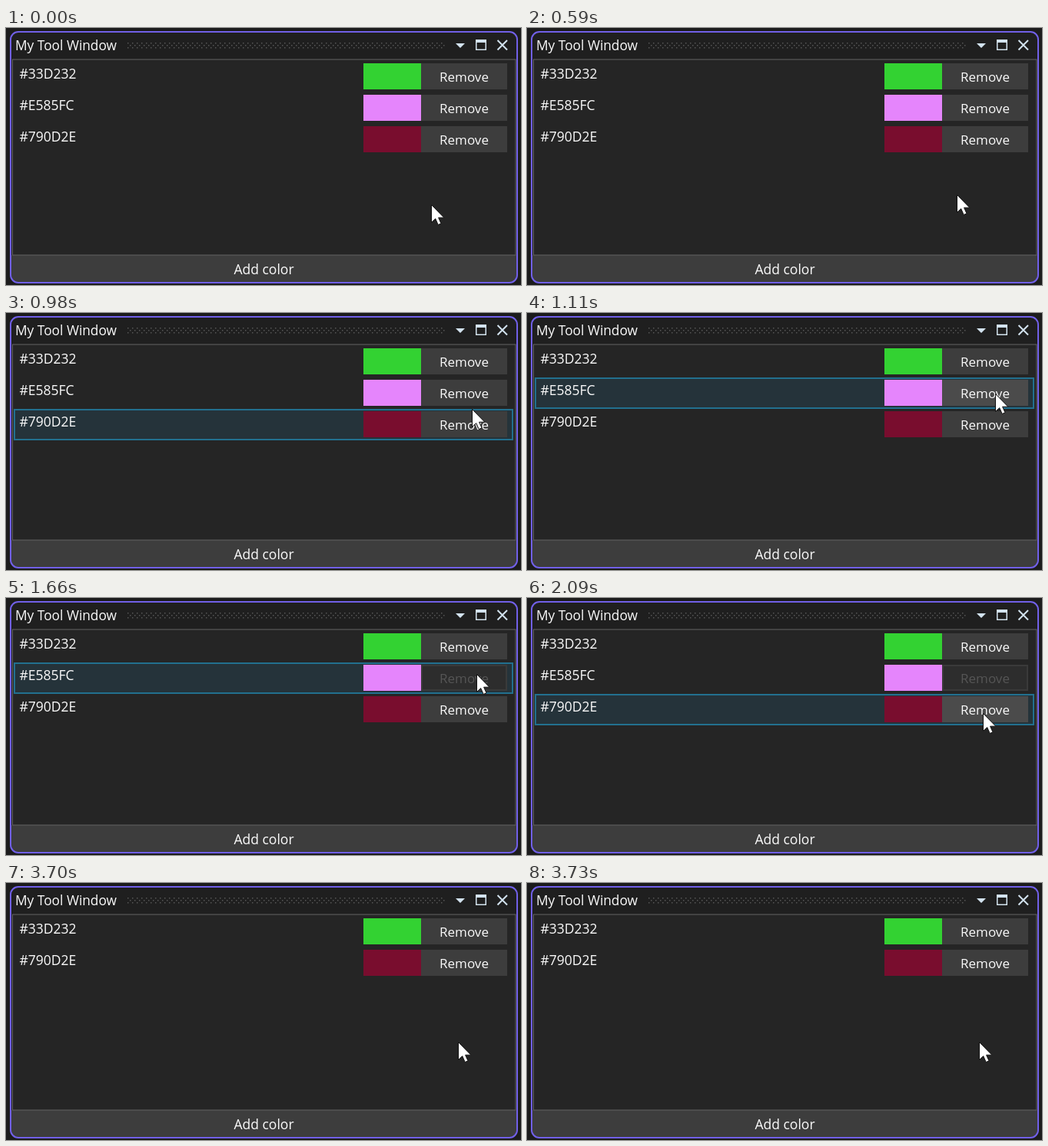
Write an HTML page that moves like this. It is 670 by 335 pixels and loops after 4.65 s.

```html
<!DOCTYPE html>
<html lang="en">
<head>
<meta charset="utf-8">
<title>Tool window</title>
<style>
  html, body { margin: 0; width: 100%; height: 100%; overflow: hidden; background: #1c1c1c; }
  svg { display: block; width: 100%; height: 100%; }
  text { font-family: "Open Sans", "Noto Sans", sans-serif; font-size: 17.5px; fill: #fafafa; }
  .title { font-size: 17.3px; }
  .remove { font-size: 17px; }
  .centered { text-anchor: middle; }
  .icon { fill: #d3e3ef; }
</style>
</head>
<body>
<svg viewBox="0 0 670 335">
  <defs>
    <pattern id="grip" x="158" y="19" width="6" height="6" patternUnits="userSpaceOnUse">
      <path d="M0 0h1.5v1.5h-1.5zM3 3h1.5v1.5h-1.5z" fill="#565656"/>
    </pattern>
  </defs>

  <rect x="6" y="5" width="659" height="327" rx="10" fill="#1f1f1f"/>
  <path d="M7 296H664V322Q664 331 655 331H16Q7 331 7 322Z" fill="#3d3d3d"/>
  <rect x="8.5" y="41" width="654.5" height="255" fill="#252525" stroke="#646464"/>
  <rect x="6" y="5" width="659" height="327" rx="10" fill="none" stroke="#7160e8" stroke-width="2"/>

  <text class="title" x="12" y="29">My Tool Window</text>
  <rect x="158" y="19" width="414" height="8" fill="url(#grip)"/>
  <path class="icon" d="M585 20h12l-6 6zM611 15h14v14h-14zM612.5 19v8.5h11v-8.5z" fill-rule="evenodd"/>
  <path d="M639.5 16L652 28.5M652 16L639.5 28.5" stroke="#d3e3ef" stroke-width="2"/>

  <g id="rows"></g>
  <text class="centered" x="335.5" y="321">Add color</text>
  <path id="cursor" d="M.5 .5V23.5L5.7 18.6L9.2 26.5L13 24.8L9.6 17.2H16.8Z"
        fill="#fff" stroke="#111" stroke-width="1"/>
</svg>

<script>
const LOOP = 4650, PRESS = 1530, DISABLE = 1660, REMOVE = 3700;
const ROW_TOP = 43, ROW_HEIGHT = 41;
const COLORS = ["#33D232", "#E585FC", "#790D2E"];

// time, x, y, number of held steps until the next key
const PATH = [
  [0, 553, 230, 1],
  [590, 559, 217, 6],
  [785, 585, 167, 6],
  [980, 606, 125, 4],
  [1110, 609, 105, 1],
  [1210, 611, 101, 1],
  [1240, 612, 99, 1],
  [2020, 607, 113, 2],
  [2090, 593, 150, 5],
  [2260, 588, 191, 4],
  [2390, 588, 207, 1],
  [LOOP, 588, 207, 1]
];

const BUTTON = {
  normal: ["#3d3d3d", "#3d3d3d", "#fafafa"],
  hover: ["#4b4b4b", "#4b4b4b", "#fafafa"],
  pressed: ["#555555", "#555555", "#fafafa"],
  disabled: ["#2d2d2d", "#3a3a3a", "#555555"]
};

function add(parent, tag, attributes, text = "") {
  const node = document.createElementNS("http://www.w3.org/2000/svg", tag);
  for (const name in attributes) node.setAttribute(name, attributes[name]);
  node.textContent = text;
  return parent.appendChild(node);
}

const cursor = document.getElementById("cursor");
const rows = COLORS.map(color => {
  const group = add(document.getElementById("rows"), "g", {});
  const highlight = add(group, "rect",
    { x: 11, y: 1, width: 648, height: 39, fill: "#25333a", stroke: "#22708f", "stroke-width": 2 });
  add(group, "text", { x: 17.5, y: 23 }, color);
  const button = add(group, "rect", { x: 541, y: 4, width: 110, height: 32, "stroke-width": 2 });
  add(group, "rect", { x: 465, y: 3, width: 75, height: 34, fill: color });
  const label = add(group, "text", { x: 596, y: 27, class: "remove centered" }, "Remove");
  return { group, highlight, button, label };
});

function cursorAt(time) {
  const i = PATH.findIndex((key, n) => n === PATH.length - 2 || time < PATH[n + 1][0]);
  const [start, x, y, steps] = PATH[i];
  const [end, nextX, nextY] = PATH[i + 1];
  const u = Math.floor((time - start) / (end - start) * steps + 1e-6) / steps;
  return [x + (nextX - x) * u, y + (nextY - y) * u];
}

function buttonState(index, x, localY, time) {
  if (index === 1 && time >= DISABLE) return "disabled";
  const over = x >= 540 && x < 652 && localY >= 3 && localY < 37;
  if (!over) return "normal";
  return index === 1 && time >= PRESS ? "pressed" : "hover";
}

function draw(time) {
  const [x, y] = cursorAt(time);
  const removed = time >= REMOVE;
  cursor.setAttribute("transform", `translate(${x} ${y})`);

  rows.forEach((row, index) => {
    const slot = removed && index === 2 ? 1 : index;
    const top = ROW_TOP + slot * ROW_HEIGHT;
    const localY = y - top;
    const [fill, stroke, ink] = BUTTON[buttonState(index, x, localY, time)];
    row.group.setAttribute("transform", `translate(0 ${top})`);
    row.group.style.display = removed && index === 1 ? "none" : "";
    row.highlight.style.display = localY >= 0 && localY < ROW_HEIGHT ? "" : "none";
    row.button.setAttribute("fill", fill);
    row.button.setAttribute("stroke", stroke);
    row.label.style.fill = ink;
  });
}

const startTime = performance.now();
function tick() {
  draw((performance.now() - startTime) % LOOP);
  requestAnimationFrame(tick);
}
tick();
</script>
</body>
</html>
```
